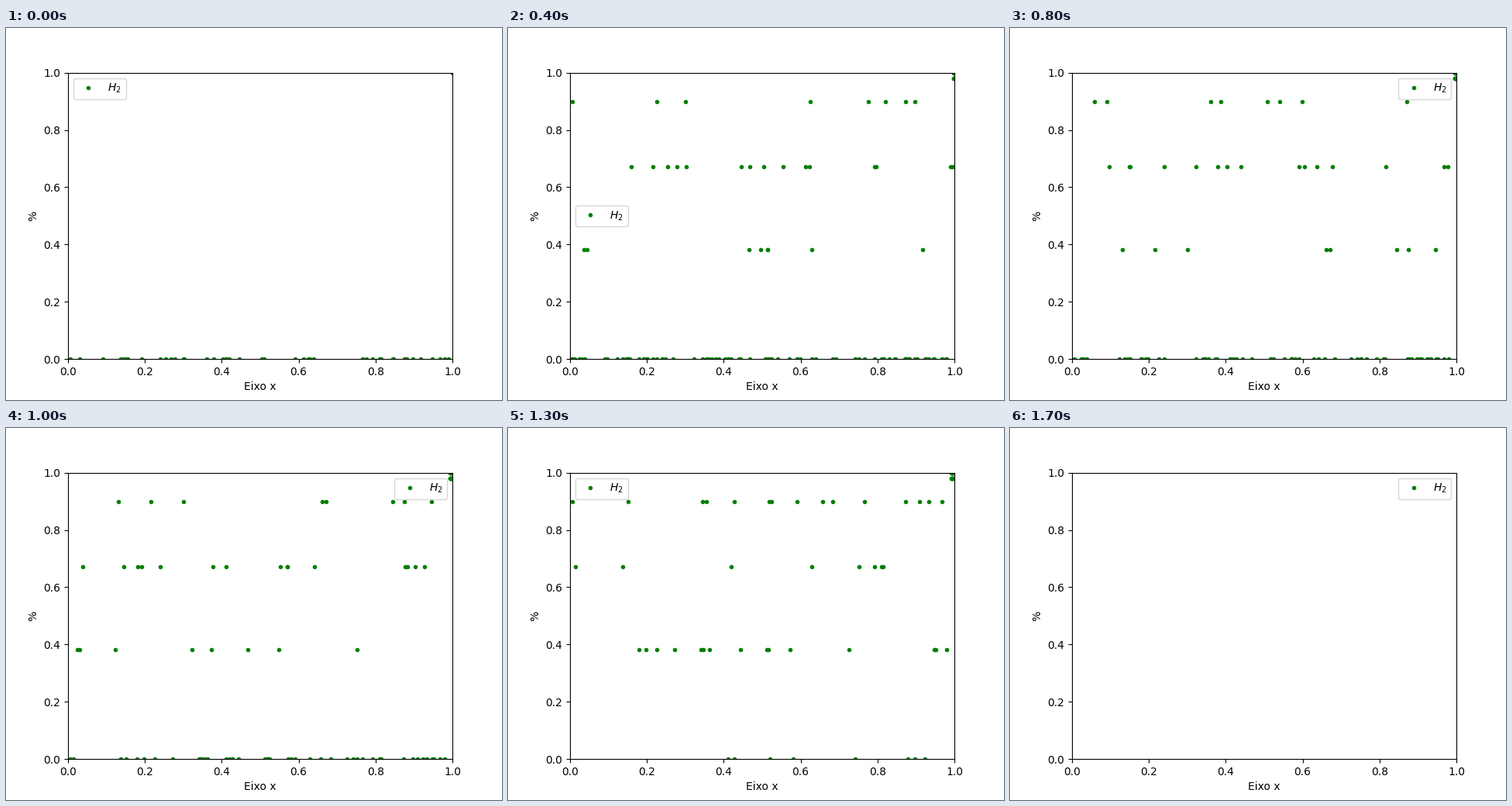
Animation, 640 px wide and 480 px high, one loop 3000 ms. Source, as a matplotlib script:

```python
import numpy as np
import matplotlib.pyplot as plt
from matplotlib.animation import FuncAnimation

STEPS, FRAMES, INTERVAL = 17, 30, 100
LEVELS = np.array([0.382, 0.672, 0.90])
FIRST_CLIMB, LAST_CLIMB = 2, 14
LEGEND_MOVES = {0: "upper left", 4: "center left", 5: "upper right",
                12: "upper left", 16: "upper right"}

# Odd steps release about twice as many particles as even ones.
rng = np.random.default_rng(7)
climb = np.concatenate([np.full(15 if step % 2 else 8, step)
                        for step in range(FIRST_CLIMB, LAST_CLIMB + 1)])
particle_x = rng.random(climb.size)
arrival = np.floor(climb * rng.random(climb.size) ** 1.5)


def corner_dots(step):
    """Dots gathering in the upper right corner, spreading slowly left."""
    if step == 0:
        return np.array([[1, 1]])
    xs = 1 - 0.0006 * step * np.linspace(0.5, 1, 1 + step // 2)
    return np.array([(x, y) for x in xs for y in (0.98, 1)])


def dots_at(step):
    """Particles rest on the floor, climb the levels and leave."""
    if step >= STEPS:
        return np.empty((0, 2))
    age = step - climb
    shown = (arrival <= step) & (age < len(LEVELS))
    heights = np.where(age < 0, 0, LEVELS[np.clip(age, 0, len(LEVELS) - 1)])
    particles = np.column_stack([particle_x, heights])[shown]
    return np.vstack([particles, corner_dots(step)])


fig, ax = plt.subplots(figsize=(6.4, 4.8), dpi=100)
ax.set(xlim=(0, 1), ylim=(0, 1), xlabel="Eixo x", ylabel="%")
points, = ax.plot([], [], ".", color="green", label="$H_2$")
legend = ax.legend(loc="upper left")


def update(frame):
    step = min(frame, STEPS)
    points.set_data(*dots_at(step).T)
    legend.set_loc(LEGEND_MOVES[max(s for s in LEGEND_MOVES if s <= step)])
    return points, legend


anim = FuncAnimation(fig, update, frames=FRAMES, interval=INTERVAL, repeat=True)
plt.show()
```
